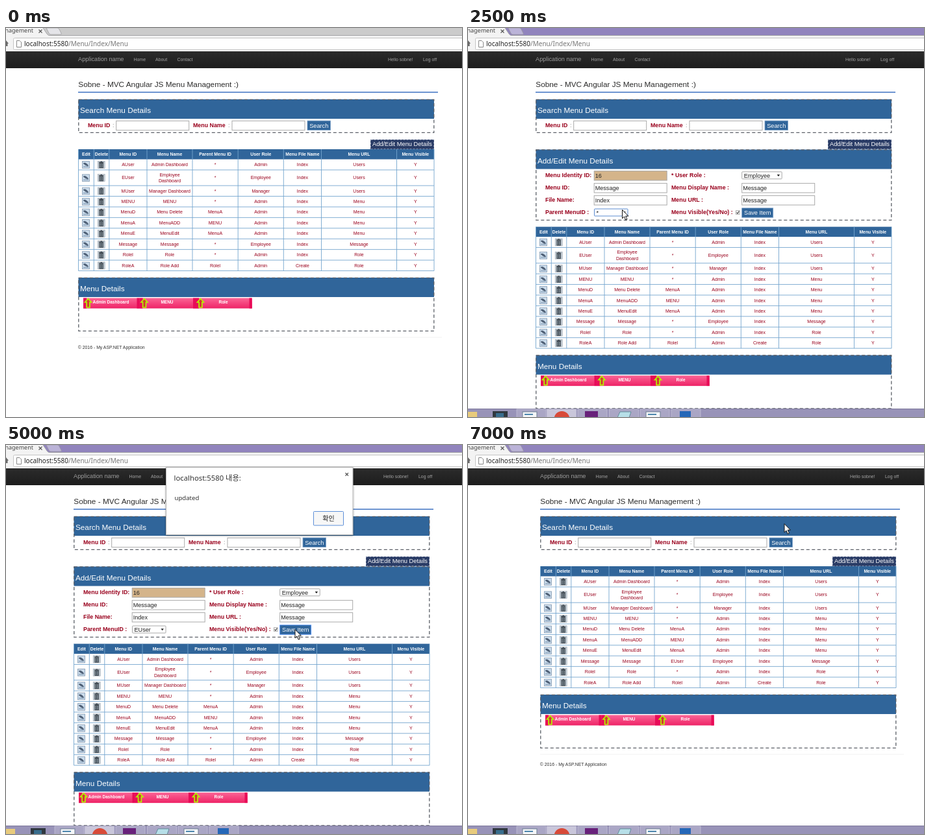
Recreate the animation shown at these times as an HTML page. Size 702 by 600 pixels, loop 7100 ms.

```html
<!DOCTYPE html>
<html lang="en">
<head>
<meta charset="utf-8">
<title>Menu Management</title>
<style>
html, body { margin: 0; width: 100%; height: 100%; overflow: hidden; background: #fff; }
svg { display: block; }
text { font-family: "Liberation Sans", Arial, sans-serif; white-space: pre; }
.ui { font-family: "Noto Sans", "Noto Sans CJK KR", "Noto Sans CJK", sans-serif; }
.dash { fill: none; stroke: #5c6068; stroke-width: 1.3; stroke-dasharray: 5 3.5; }
</style>
</head>
<body>
<svg id="stage" width="702" height="600" viewBox="0 0 702 600"></svg>
<script>
const BLUE = '#30659a', RED = '#99001c', LOOP = 7100, SHIFT = -7, DROP = 119.6;
const OPENED = 1400, SAVED = 6300, LIST = [2700, 3400], ALERT = [4500, 5800];

const rect = (x, y, w, h, fill, more = '') =>
  `<rect x="${x}" y="${y}" width="${w}" height="${h}" fill="${fill}" ${more}/>`;
const path = (d, fill, more = '') => `<path d="${d}" fill="${fill}" ${more}/>`;
// y is the vertical middle of the capitals
const text = (x, y, s, size, fill, more = '') =>
  `<text x="${x}" y="${y + size * 0.36}" font-size="${size}" fill="${fill}" ${more}>${s}</text>`;
const mid = 'text-anchor="middle"', bold = 'font-weight="bold"';
const label = (x, y, s) => text(x, y, s, 8.85, RED, bold);
const group = (id, content, more = '') => `<g id="${id}" ${more}>${content}</g>`;

const input = (x, y, value = '', fill = '#fff') =>
  rect(x, y - 7.2, 112, 14.4, fill, 'stroke="#a9a9a9"') + text(x + 1.5, y, value, 9.1, '#222');
const select = (x, y, w, value, id) =>
  rect(x, y - 5.5, w, 11, '#fff', `id="${id}Box" stroke="#a9a9a9" rx="1"`) +
  text(x + 3, y, value, 9.1, '#222', `id="${id}"`) +
  path(`M${x + w - 7.5} ${y - 1.2}h4.4l-2.2 3z`, '#222');
const button = (x, y, w, s, id) =>
  rect(x, y - 7.2, w, 14.4, BLUE, `id="${id}" stroke="#7ba0c8" stroke-width=".8"`) +
  text(x + w / 2, y, s, 9.2, '#fff', mid);
const panel = (y, h, title) =>
  rect(111.5, y, 547.5, 30, BLUE) +
  rect(111.8, y + .4, 547, h, 'none', 'class="dash"') +
  text(114, y + 17.2, title, 11.75, '#fff');

function browser() {
  return rect(0, 0, 702, 12, '#cbcbcb', 'id="titleBar"') +
    path('M62 0h17q2 0 3 2l3 6q1 2-1 2H69q-2 0-3-2z', '#e4e4e8', 'id="newTab" stroke="#999" stroke-width=".7"') +
    path('M0 0h57l6 9q1.500 2.500 4 2.500H702V37H0z', '#f3f3f3') +
    path('M57 0l6 9q1.500 2.500 4 2.500H702', 'none', 'stroke="#a5a5a8"') +
    text(42, 4, 'Management', 9, '#444', 'class="ui" text-anchor="end"') +
    path('M50.500 2.500l5 5m0-5l-5 5', 'none', 'stroke="#555" stroke-width="1.200"') +
    rect(11.5, 15.5, 700, 18, '#fff', 'stroke="#c4c4c4" rx="2"') +
    path('M0 19l4 5H2.500v4H0z', '#666') +
    path('M16.500 19.500h4.500l2.500 2.500v7.500h-7z', '#fff', 'stroke="#888"') +
    text(28, 24, 'localhost:5580<tspan fill="#777">/Menu/Index/Menu</tspan>', 10.02, '#222', 'class="ui"') +
    rect(0, 36, 702, 26, 'url(#nav)');
}

function header() {
  const links = [[196.5, 'Home'], [230, 'About'], [263.5, 'Contact'], [588, 'Hello sobne!'], [642, 'Log off']];
  return text(111, 48, 'Application name', 9.2, '#9d9d9d') +
    links.map(([x, s]) => text(x, 48, s, 6.95, '#a4a4a4')).join('') +
    text(111.3, 86.6, 'Sobne - MVC Angular JS Menu Management :)', 11.8, '#2b2b2b') +
    rect(111, 98.3, 554, 1.6, '#4a7bc6') +
    panel(110, 51, 'Search Menu Details') +
    label(126, 150, 'Menu ID') + text(164, 150, ':', 8.85, '#888') + input(169.7, 150.5) +
    label(288, 150, 'Menu Name') + text(342, 150, ':', 8.85, '#888') + input(348, 150.5) +
    button(464, 150.3, 35.5, 'Search', 'search') +
    rect(561, 172, 98, 15, '#2a3c66') +
    rect(561.5, 172.5, 97, 14, 'none', 'stroke="#a9b2c8" stroke-width=".7" stroke-dasharray="3 2"') +
    text(610, 179, 'Add/Edit Menu Details', 9.3, '#fff', mid);
}

function form() {
  return panel(187.5, 108.5, 'Add/Edit Menu Details') +
    label(126, 227.3, 'Menu Identity ID:') + input(201.2, 227.8, '16', '#d4b48a') +
    label(126, 246.3, 'Menu ID:') + input(201.2, 246.8, 'Message') +
    label(126, 265.3, 'File Name:') + input(201.2, 265.8, 'Index') +
    label(126, 284.3, 'Parent MenuID :') + select(201.5, 284.5, 51.5, '*', 'parent') +
    label(320, 227.3, '* User Role :') + select(428.7, 227.3, 61.5, 'Employee', 'role') +
    label(320, 246.3, 'Menu Display Name :') + input(428.7, 246.8, 'Message') +
    label(320, 265.3, 'Menu URL :') + input(428.7, 265.8, 'Message') +
    label(320, 284.3, 'Menu Visible(Yes/No) :') +
    rect(419.5, 281.7, 5.6, 5.6, '#fff', 'stroke="#aaa"') +
    path('M420.500 284.500l1.500 1.700 2.400-3.700', 'none', 'stroke="#333" stroke-width="1.100"') +
    button(428.7, 285, 48, 'Save Item', 'save');
}

const columns = [111.5, 135.3, 158.8, 217, 287, 357.2, 427.3, 485.5, 601.5, 659];
const titles = ['Edit', 'Delete', 'Menu ID', 'Menu Name', 'Parent Menu ID', 'User Role', 'Menu File Name', 'Menu URL', 'Menu Visible'];
const menus = [
  'AUser|Admin Dashboard|*|Admin|Index|Users',
  'EUser|Employee Dashboard|*|Employee|Index|Users',
  'MUser|Manager Dashboard|*|Manager|Index|Users',
  'MENU|MENU|*|Admin|Index|Menu',
  'MenuD|Menu Delete|MenuA|Admin|Index|Menu',
  'MenuA|MenuADD|MENU|Admin|Index|Menu',
  'MenuE|MenuEdit|MenuA|Admin|Index|Menu',
  'Message|Message|*|Employee|Index|Message',
  'RoleI|Role|*|Admin|Index|Role',
  'RoleA|Role Add|RoleI|Admin|Create|Role'
].map(row => [...row.split('|'), 'Y']);

const editIcon = (x, y) =>
  rect(x - 5.5, y - 5.2, 11, 10.6, '#cbdcec', 'stroke="#8a9fb6" stroke-width=".9"') +
  path(`M${x - 4} ${y - 2.5}q4-2 8 4l-1 1q-4-1-7-4z`, '#4f6076') +
  path(`M${x - 4} ${y + 3}h8`, 'none', 'stroke="#7890aa"');
const trashIcon = (x, y) =>
  rect(x - 5.5, y - 5.5, 11, 11, '#c3ccd4', 'stroke="#a0aab4" stroke-width=".6"') +
  path(`M${x - 3.5} ${y - 3.5}h7M${x - 1} ${y - 4.6}h2`, 'none', 'stroke="#3c454d" stroke-width="1.300"') +
  rect(x - 2.8, y - 2.4, 5.6, 7.2, '#76828c', 'stroke="#3c454d" stroke-width=".9"') +
  path(`M${x} ${y - 2}v6.500`, 'none', 'stroke="#3c454d"');

function table() {
  const center = i => (columns[i] + columns[i + 1]) / 2;
  let out = rect(111.5, 187, 547.5, 15.5, BLUE), lines = '', y = 202.5;
  titles.forEach((s, i) => { out += text(center(i), 194.5, s, 6.85, '#fff', `${mid} ${bold}`); });
  menus.forEach((row, r) => {
    const h = r === 1 ? 24.2 : 16.42, cy = y + h / 2 - .2;
    out += editIcon(123, cy + .3) + trashIcon(146.7, cy + .3);
    row.forEach((s, i) => {
      const x = center(i + 2), words = s.split(' ');
      if (r === 1 && words[1])
        words.forEach((w, k) => { out += text(x, cy - 4.7 + k * 9.8, w, 7, RED, mid); });
      else out += text(x, cy, s, 7, RED, mid + (s === '*' || r !== 7 || i !== 2 ? '' : '') + (r === 7 && i === 2 ? ' id="messageParent"' : ''));
    });
    y += h;
    lines += `M111.500 ${y}H659`;
  });
  columns.forEach(x => { lines += `M${x} 187V${y}`; });
  return out + path(lines, 'none', 'stroke="#74a5cf" stroke-width=".9"');
}

function menuBar() {
  let out = panel(385, 82, 'Menu Details') + rect(119, 416.5, 260, 16, 'url(#pink)');
  ['Admin Dashboard', 'MENU', 'Role'].forEach((s, i) => {
    const x = 119 + i * 86.5;
    out += rect(x, 416.5, 5, 16, '#e80b58') + rect(x + 82.5, 416.5, 4, 16, '#e80b58') +
      path(`M${x + 7.5} 417.500l5 5.500h-2.600v8h-4.800v-8h-2.600z`, '#d33a30', 'stroke="#b4f500" stroke-width="1.700"') +
      text(x + 42.5, 423, s, 6.5, '#fff', `${mid} ${bold}`);
  });
  return out + rect(111, 476.7, 560, .8, '#eee') +
    text(110.7, 492.5, '© 2016 - My ASP.NET Application', 6.9, '#333');
}

function taskbar() {
  let out = rect(0, 587, 702, 13, '#9893b8') + rect(0, 587, 702, 1, '#7d789c');
  [75, 121.5, 169, 217.5, 265, 313].forEach((x, i) => {
    out += rect(x, 588, 45, 13, i === 1 ? '#c9c6da' : '#aaa6c5', 'stroke="#c3c0d8" stroke-width=".8"');
  });
  const page = x => rect(x, 592, 22, 9, '#f4f6f8', 'stroke="#6c7f94"') + rect(x + 3, 595, 13, 2, '#4d86ad');
  return out + rect(0, 592, 14, 8, '#e8cb7c') +
    rect(38, 591, 23, 9, '#30383f') + rect(43, 594, 12, 6, '#386d8d') +
    page(84) + '<circle cx="144.500" cy="603" r="12" fill="#d84a38"/>' +
    rect(180, 591, 20, 10, '#68217a') +
    path('M234 592h17l-3 9h-18z', '#b7dfe8', 'stroke="#618c9b"') + page(274) +
    rect(326, 591, 17, 10, '#2567b8');
}

function options() {
  let out = rect(201.5, 290.5, 51.5, 132, '#fff', 'stroke="#999"') + rect(202, 291, 50.5, 12, '#3875d7', 'id="highlight"');
  ['*', ...menus.map(m => m[0])].forEach((s, i) => {
    out += text(204.5, 296.8 + i * 12, s, 9.1, '#222', 'class="option"');
  });
  return out;
}

function dialog() {
  return rect(246.5, 34.5, 287.5, 104, '#fff', 'stroke="#b5b5b5" filter="url(#shadow)"') +
    text(258.5, 50.5, 'localhost:5580 내용:', 11.3, '#333', 'class="ui"') +
    text(259.5, 81.8, 'updated', 9.6, '#333', 'class="ui"') +
    path('M522.500 43l4.500 4.500m0-4.500l-4.500 4.500', 'none', 'stroke="#555" stroke-width="1.200"') +
    rect(473.5, 102.5, 46, 21.5, '#f7f7f7', 'stroke="#5d8fd8" rx="1"') +
    text(496.5, 113, '확인', 10, '#222', `class="ui" ${mid}`);
}

const $ = id => document.getElementById(id);
$('stage').innerHTML = `<defs>
  <linearGradient id="nav" x2="0" y2="1"><stop stop-color="#2b2b2b"/><stop offset="1" stop-color="#1d1d1d"/></linearGradient>
  <linearGradient id="pink" x2="0" y2="1"><stop stop-color="#fb6495"/><stop offset="1" stop-color="#ee2467"/></linearGradient>
  <filter id="shadow"><feDropShadow dx="0" dy="1" stdDeviation="1.500" flood-opacity=".4"/></filter></defs>` +
  rect(0, 0, 702, 600, '#fff') + browser() +
  group('page', header() + group('form', form()) + group('lower', table() + menuBar()) + group('options', options())) +
  group('taskbar', taskbar()) + group('dialog', dialog()) +
  group('arrow', path('M0 0v13.200l3-2.800 2.200 5.200 2.200-1-2.200-5h4.200z', '#fff', 'stroke="#111" stroke-linejoin="round"')) +
  group('hand', path('M0 1q1.500-1.500 2.700 0v6q4-1 7.500 2v5l-1.700 4.500H1.500L-3.500 11q0-2 2-1.500L0 11z', '#fff', 'stroke="#111" stroke-linejoin="round"') +
    path('M2.700 7v3.500m2.500-3v3m2.500-2.500v2.500', 'none', 'stroke="#111" stroke-width=".8"'));

// time, x, y of the pointer tip
const route = [
  [500, 330, 560], [1100, 122.5, 333], [1500, 122.5, 333], [2400, 237.5, 280.5], [2700, 237.5, 280.5],
  [3100, 215, 321], [3400, 215, 321], [4000, 458, 289.5], [4500, 458, 289.5], [4800, 445, 284.5],
  [5000, 445, 284.5], [5600, 499.5, 111.5], [6300, 499.5, 111.5], [6900, 487, 121.5], [LOOP, 487, 121.5]
];
function pointer(t) {
  const i = Math.max(1, route.findIndex(p => p[0] > t));
  const [a, b] = [route[i - 1], route[i]];
  const k = Math.max(0, (t - a[0]) / (b[0] - a[0])), e = k * k * (3 - 2 * k);
  return [a[1] + (b[1] - a[1]) * e, a[2] + (b[2] - a[2]) * e];
}

const show = (id, on) => $(id).setAttribute('display', on ? 'inline' : 'none');
const within = (t, [from, to]) => t >= from && t < to;

function draw(t) {
  const open = within(t, [OPENED, SAVED]), focused = t >= OPENED;
  const [x, y] = pointer(t), hand = within(t, [3900, ALERT[0]]);
  $('titleBar').setAttribute('fill', focused ? '#9184bd' : '#cbcbcb');
  $('newTab').setAttribute('fill', focused ? '#bbb3d8' : '#e4e4e8');
  $('page').setAttribute('transform', `translate(${open ? SHIFT : 0} 0)`);
  $('lower').setAttribute('transform', `translate(0 ${open ? DROP : 0})`);
  show('form', open);
  show('taskbar', focused);
  show('options', within(t, LIST));
  show('dialog', within(t, ALERT));
  $('parent').textContent = t < LIST[1] ? '*' : 'EUser';
  $('messageParent').textContent = t < SAVED ? '*' : 'EUser';
  $('parentBox').setAttribute('stroke', within(t, [2500, ALERT[0]]) ? '#5b8bd0' : '#a9a9a9');
  $('save').setAttribute('stroke', t >= ALERT[0] ? '#4d90fe' : '#7ba0c8');
  const row = Math.max(0, Math.floor((y - 291) / 12));
  $('highlight').setAttribute('y', 291 + row * 12);
  document.querySelectorAll('.option').forEach((o, i) => o.setAttribute('fill', i === row ? '#fff' : '#222'));
  show('arrow', t >= 500 && !hand);
  show('hand', hand);
  $(hand ? 'hand' : 'arrow').setAttribute('transform', `translate(${x} ${y})`);
}

let last = -1;
function tick() {
  const t = Math.floor(performance.now() % LOOP / 100) * 100;
  if (t !== last) draw(last = t);
  requestAnimationFrame(tick);
}
tick();
</script>
</body>
</html>
```
